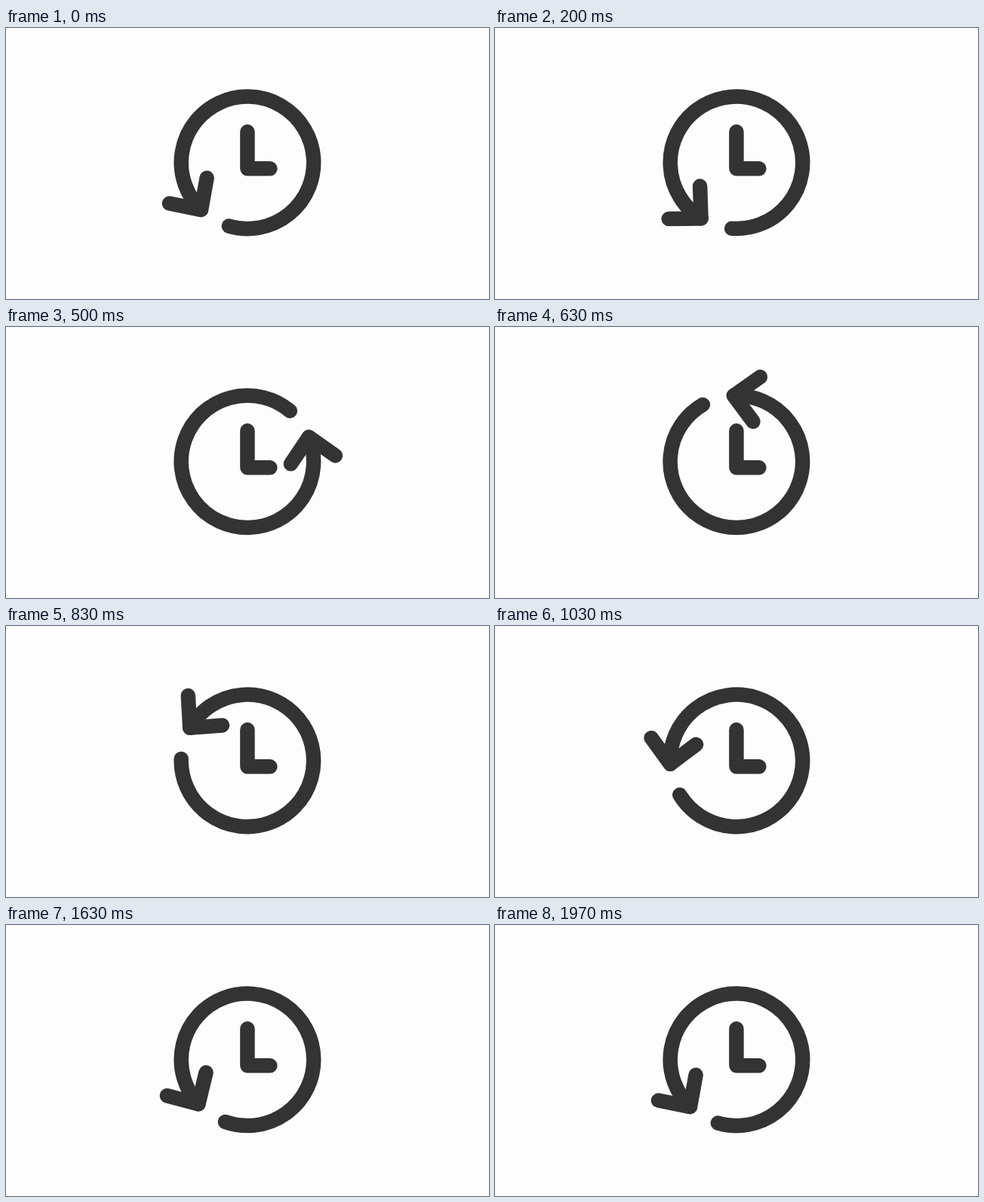
Write an HTML page that moves like this. It is 640x360 px and loops after 2.01 s.

```html
<!DOCTYPE html>
<html lang="en">
<head>
<meta charset="utf-8">
<title>Rewinding clock</title>
<style>
  html, body { margin: 0; width: 100%; height: 100%; overflow: hidden; background: #fdfdfd; }
  svg { display: block; width: 100%; height: 100%; }
  path { fill: none; stroke: #333; stroke-width: 19.5; stroke-linecap: round; stroke-linejoin: round; }
</style>
</head>
<body>
<svg viewBox="0 0 640 360">
  <g transform="translate(319.9 178.8)">
    <path d="M0 -41V8H30"/>
    <g id="arrow">
      <path d="M-24.5 84.3A87.75 87.75 0 1 0 -61.4 62.7"/>
      <path d="M-103.4 54.2L-61.4 62.7L-53.8 20.4"/>
    </g>
  </g>
</svg>
<script>
  const LOOP = 2010, LAST = 59, MOVE = 58;
  const arrow = document.getElementById('arrow');

  // Cubic Bezier with control points (x1, 0) and (x2, 1)
  function ease(x, x1 = 0.388, x2 = 0.02) {
    let lo = 0, hi = 1;
    for (let i = 0; i < 24; i++) {
      const s = (lo + hi) / 2, r = 1 - s;
      if (3 * r * r * s * x1 + 3 * r * s * s * x2 + s ** 3 < x) lo = s;
      else hi = s;
    }
    return lo * lo * (3 - 2 * lo);
  }

  // 30 steps per second, with step times rounded to 10 ms
  function draw(now) {
    const ticks = Math.floor((now % LOOP) / 10);
    const step = Math.min(LAST, Math.floor((ticks + 0.5) * 0.3));
    const turn = 360 * ease(Math.min(1, step / MOVE));
    arrow.setAttribute('transform', `rotate(${-turn})`);
  }

  const start = performance.now();
  function loop() {
    draw(performance.now() - start);
    requestAnimationFrame(loop);
  }
  loop();
</script>
</body>
</html>
```
